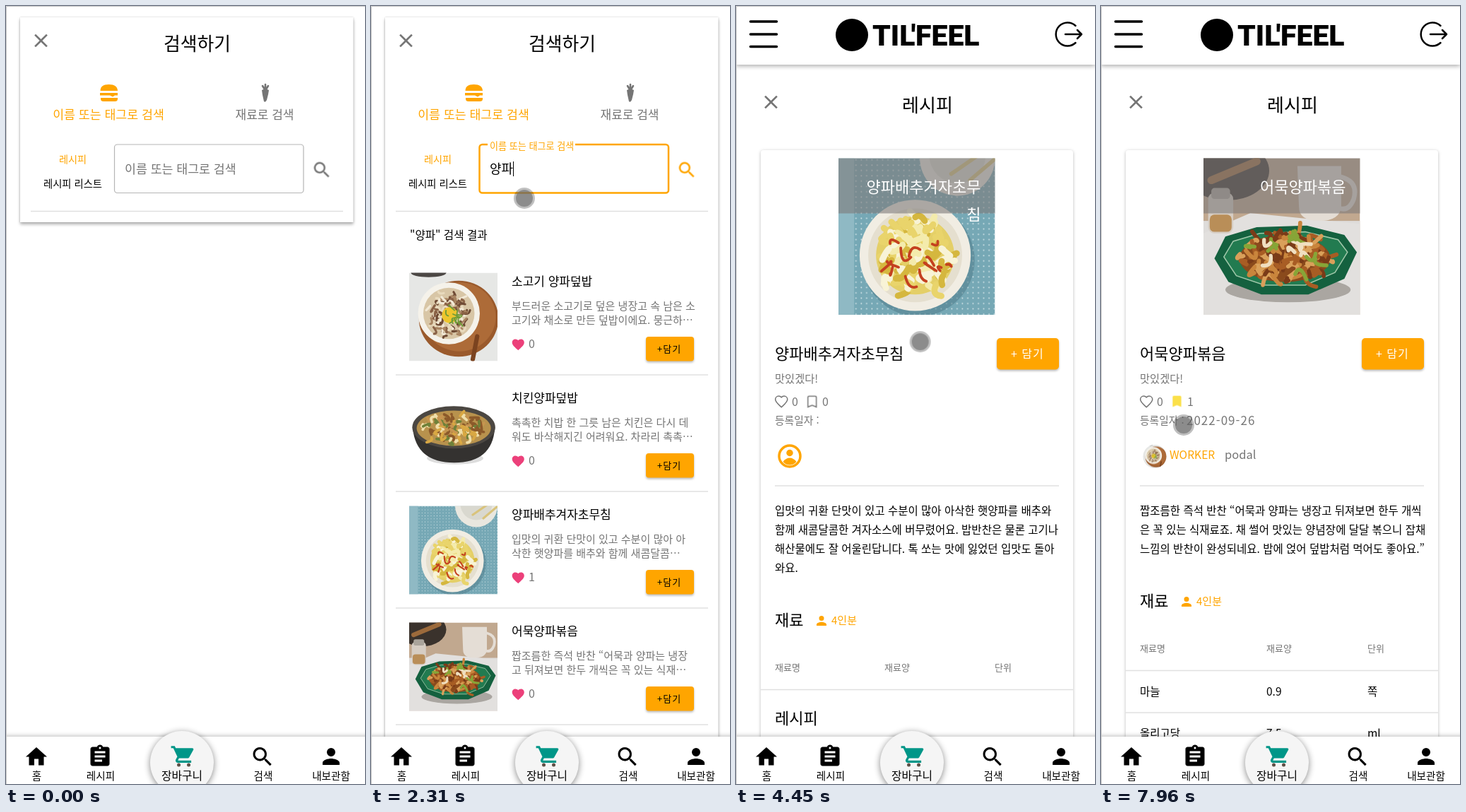
Recreate the animation shown at these times as an HTML page. Size 508 by 1101 pixels, loop 8 s.

```html
<!DOCTYPE html>
<html lang="ko">
<head>
<meta charset="utf-8">
<title>레시피 검색</title>
<style>
html, body { margin: 0; width: 100%; height: 100%; overflow: hidden; background: #fff; }
svg { display: block; }
#stage { width: 508px; height: 1101px; font-family: "Noto Sans CJK KR", "Noto Sans CJK", sans-serif; font-weight: 300; }
text { white-space: pre; }
.mid { text-anchor: middle; }
.end { text-anchor: end; }
.bold { font-weight: 500; }
.orange { fill: #ffa500; }
.gray { fill: #757575; }
.brand { font: 900 41px Roboto, sans-serif; }
.card { fill: #fff; filter: drop-shadow(0 3px 2px #0004) drop-shadow(0 0 1px #0003); }
.paper { fill: #fff; filter: drop-shadow(0 1px 2px #0004); }
.button { fill: #ffa500; filter: drop-shadow(0 2px 1.5px #0004); }
.rule { stroke: #e0e0e0; stroke-width: 1.3; }
.line { fill: none; stroke-linecap: round; stroke-linejoin: round; }
#label { animation: float 8s infinite; }
#toast { transform-box: fill-box; transform-origin: center; animation: toast 8s infinite; }
#toast rect { fill: #323232; filter: drop-shadow(0 4px 5px #0006); }
#pointer { animation: pointer 8s linear infinite; }
</style>
</head>
<body>
<svg id="stage" viewBox="0 0 508 1101"></svg>
<script>
const LOOP = 8000;

const icons = {
  home: 'M10 20v-6h4v6h5v-8h3L12 3 2 12h3v8z',
  recipe: 'M19 3h-4.18C14.4 1.84 13.3 1 12 1s-2.4.84-2.82 2H5c-1.1 0-2 .9-2 2v14c0 1.1.9 2 2 2h14c1.1 0 2-.9 2-2V5c0-1.1-.9-2-2-2zm-7 0c.55 0 1 .45 1 1s-.45 1-1 1-1-.45-1-1 .45-1 1-1zm2 14H7v-2h7v2zm3-4H7v-2h10v2zm0-4H7V7h10v2z',
  search: 'M15.5 14h-.79l-.28-.27A6.5 6.5 0 1 0 13.73 14.43l.27.28v.79l5 4.99L20.49 19zm-6 0a4.5 4.5 0 1 1 0-9 4.5 4.5 0 0 1 0 9z',
  person: 'M12 12a4 4 0 1 0 0-8 4 4 0 0 0 0 8zm0 2c-2.67 0-8 1.34-8 4v2h16v-2c0-2.66-5.33-4-8-4z',
  cart: 'M1 2v2h2l3.6 7.59-1.35 2.45C4.5 15.4 5.5 17 7 17h12v-2H7.42c-.2 0-.3-.2-.22-.37l.9-1.63h7.45c.75 0 1.41-.41 1.75-1.03l3.58-6.49A1 1 0 0 0 20 4H5.21l-.94-2z',
  close: 'M19 6.41 17.59 5 12 10.59 6.41 5 5 6.41 10.59 12 5 17.59 6.41 19 12 13.41 17.59 19 19 17.59 13.41 12z',
  heart: 'M12 21.35l-1.45-1.32C5.4 15.36 2 12.28 2 8.5 2 5.42 4.42 3 7.5 3c1.74 0 3.41.81 4.5 2.09C13.09 3.81 14.76 3 16.5 3 19.58 3 22 5.42 22 8.5c0 3.78-3.4 6.86-8.55 11.54z',
  bookmark: 'M17 3H7c-1.1 0-2 .9-2 2v16l7-3 7 3V5c0-1.1-.9-2-2-2z'
};

const text = (x, y, size, str, attrs = '') => `<text x="${x}" y="${y}" font-size="${size}" ${attrs}>${str}</text>`;
const icon = (name, x, y, size, attrs = '') =>
  `<path transform="translate(${x} ${y}) scale(${size / 24})" d="${icons[name]}" ${attrs}/>`;
const rect = (x, y, w, h, attrs = '') => `<rect x="${x}" y="${y}" width="${w}" height="${h}" ${attrs}/>`;
const circle = (x, y, r, attrs = '') => `<circle cx="${x}" cy="${y}" r="${r}" ${attrs}/>`;
const ellipse = (x, y, rx, ry, attrs = '') => `<ellipse cx="${x}" cy="${y}" rx="${rx}" ry="${ry}" ${attrs}/>`;
const rule = (x1, x2, y) => `<path class="rule" d="M${x1} ${y}H${x2}"/>`;
const photo = (name, x, y, size) => `<use href="#${name}" x="${x}" y="${y}" width="${size}" height="${size}"/>`;
const during = (spans, content) => `<g data-on="${spans}">${content}</g>`;

// Short random curls that read as food
function food(count, cx, cy, rx, ry, colors, width) {
  let seed = count * 7 + 3;
  const rnd = () => (seed = (seed * 16807) % 2147483647) / 2147483647;
  rnd(); rnd();
  return Array.from({ length: count }, () => {
    const a = rnd() * 6.283, d = Math.sqrt(rnd());
    const x = cx + Math.cos(a) * d * rx, y = cy + Math.sin(a) * d * ry;
    const step = () => ((rnd() - .5) * 15).toFixed(1);
    return `<path class="line" stroke="${colors[Math.floor(rnd() * colors.length)]}" stroke-width="${width}"
      d="M${x.toFixed(1)} ${y.toFixed(1)}q${step()} ${step()} ${step()} ${step()}"/>`;
  }).join('');
}

const dishes = {
  beef: rect(0, 0, 100, 100, 'fill="#e6e7e5"') + ellipse(22, 0, 20, 5, 'fill="#4b4744"') +
    ellipse(56, 52, 45, 43, 'fill="#9a5a2c"') + ellipse(57, 50, 41, 39, 'fill="#ad6b38"') +
    circle(45, 46, 35, 'fill="#f5f2ea"') + circle(45, 46, 29, 'fill="#d8c6a6"') +
    food(85, 45, 46, 24, 24, ['#8a6246', '#f2e9d6', '#a98562', '#6f4b35', '#e8dabd'], 2.5) +
    circle(46, 48, 9, 'fill="#edc52d"') + food(12, 52, 52, 10, 10, ['#6f9b38'], 1.5) +
    '<path class="line" d="M72 98 77 72" stroke="#7b431f" stroke-width="5"/>',
  chicken: rect(0, 0, 100, 100, 'fill="#fff"') + ellipse(52, 78, 32, 7, 'fill="#ddd"') +
    '<path d="M4 44Q8 83 51 83T97 44Z" fill="#343230"/>' + ellipse(50.5, 43, 47, 24, 'fill="#4b4742"') +
    ellipse(50.5, 44, 42, 20, 'fill="#b8924d"') +
    food(90, 50, 44, 33, 17, ['#d9a843', '#f0dfaa', '#8c5a2a', '#c79550', '#6f8139'], 3),
  cabbage: rect(0, 0, 100, 100, 'fill="#76a8b5"') + rect(0, 0, 100, 100, 'fill="url(#dots)"') +
    rect(0, 0, 10, 100, 'fill="#8fb9c4"') +
    circle(76, 0, 24, 'fill="#e9e7df"') + circle(76, -2, 18, 'fill="#d9d8cf"') +
    '<path class="line" d="M72 10 98-8M84 14 104-3" stroke="#d9c37b" stroke-width="2.5"/>' +
    ellipse(51, 65, 36, 36, 'fill="#4c7b88" opacity=".5"') + circle(49, 62, 35.5, 'fill="#f1ede3"') +
    circle(49, 62, 30, 'fill="#e5dfcf"') + ellipse(49, 62, 25, 25, 'fill="#e4cf67"') +
    food(110, 49, 62, 23, 23, ['#e9d46b', '#f4ebac', '#d5b73e', '#f8f3d6'], 4) +
    food(13, 49, 62, 22, 22, ['#c4411f'], 1.7),
  fishcake: rect(0, 0, 100, 100, 'fill="#c1a88f"') + rect(0, 40, 100, 60, 'fill="#dedcda"') +
    '<path d="M0 48 30 35 100 42V100H0Z" fill="#e2e0de"/>' +
    ellipse(15, 8, 27, 19, 'fill="#3a322c"') + '<path class="line" d="M5 14 34 2" stroke="#9c6a3b" stroke-width="5"/>' +
    '<path d="M60 5H88V31Q87 40 74 40T61 31Z" fill="#e4ddd5"/><path class="line" d="M88 12q11 3 8 14-3 8-9 6" stroke="#e4ddd5" stroke-width="3"/>' +
    rect(3, 22, 16, 26, 'rx="4" fill="#d6cdc3"') + rect(5, 19, 12, 7, 'rx="2" fill="#aaa49b"') +
    rect(4, 36, 14, 11, 'rx="3" fill="#b98e58"') +
    ellipse(54, 84, 40, 8, 'fill="#aaa6a1"') +
    '<path d="M7 64 14 50 34 44 66 43 90 49 98 60 90 77 67 87 37 87 16 79Z" fill="#14613f"/>' +
    '<path d="M13 63 19 53 36 48 65 47 86 52 92 60 84 73 65 81 39 81 21 75Z" fill="#227b50" stroke="#9fc7a9" stroke-width=".7"/>' +
    ellipse(52, 64, 29, 15, 'fill="#8a4a1c"') +
    food(95, 52, 63, 27, 16, ['#a85d24', '#c9853c', '#7a3b18', '#d9a05a'], 2.6) +
    food(16, 50, 62, 22, 14, ['#87a537', '#f0dfc0'], 2.4)
};

const defs = `<defs>
  <pattern id="dots" width="3.4" height="3.4" patternUnits="userSpaceOnUse">${circle(1, 1, .45, 'fill="#cfe2e6"')}</pattern>
  <clipPath id="avatar">${circle(76, 637.5, 16.5)}</clipPath>
  ${Object.entries(dishes).map(([id, art]) => `<symbol id="${id}" viewBox="0 0 100 100">${art}</symbol>`).join('')}
</defs>`;

const results = [
  ['beef', '소고기 양파덮밥', '부드러운 소고기로 덮은 냉장고 속 남은 소', '고기와 채소로 만든 덮밥이에요. 뭉근하…', 0],
  ['chicken', '치킨양파덮밥', '촉촉한 치밥 한 그릇 남은 치킨은 다시 데', '워도 바삭해지긴 어려워요. 차라리 촉촉…', 0],
  ['cabbage', '양파배추겨자초무침', '입맛의 귀환 단맛이 있고 수분이 많아 아', '삭한 햇양파를 배추와 함께 새콤달콤…', 1],
  ['fishcake', '어묵양파볶음', '짭조름한 즉석 반찬 “어묵과 양파는 냉장', '고 뒤져보면 한두 개씩은 꼭 있는 식재…', 0]
];

const resultRow = ([dish, title, line1, line2, likes], i) => `<g transform="translate(0 ${i * 165})">
  ${photo(dish, 54, 377.5, 125)}
  ${text(199, 396, 17, title)}
  ${text(199, 430, 15, line1, 'class="gray"')}${text(199, 450, 15, line2, 'class="gray"')}
  ${icon('heart', 198, 469, 20.5, 'fill="#ec407a"')}${text(223, 484, 16, likes, 'class="gray"')}
  ${rect(389, 468, 68, 34.5, 'rx="4" class="button"')}${text(405, 490, 13, '+담기', 'letter-spacing="1"')}
  ${rule(35, 477, 522)}</g>`;

const closeIcon = y => icon('close', 33.5, y - 16, 32, 'class="gray"');
const fieldBox = (color, width) => rect(153.5, 196, 267.5, 68.5, `rx="4" fill="none" stroke="${color}" stroke-width="${width}"`);

const burger = `<g class="orange"><path d="M133.5 120q0-9 12-9t12.500 9z"/>
  <path d="M133 123h25v3.500h-4l-3 2-4-2h-14z"/><path d="M134 130h24v1.500q0 3.500-4 3.500h-16q-4 0-4-3.500z"/></g>`;
const carrot = `<g class="gray"><path d="M362 119q5-3 10 0l-1 6-2 8q-2 4-4 2l-2-9z"/>
  <path class="line" stroke="#757575" stroke-width="2.600" d="M367 119v-8M366 118l-3-5M368 118l3-5"/></g>`;

const typed = [[1370, 1435, 'ㅇ'], [1435, 1500, '야'], [1500, 1640, '양'], [1640, 1770, '양ㅍ'], [1770, 3850, '양파']];

const searchPage = during('0 3850', `
  ${during('0 2230', rect(20, 16, 471.5, 290, 'class="card"'))}
  ${during('2230 3850', rect(20, 16, 471.5, 1100, 'class="card"'))}
  ${closeIcon(49)}${text(270.5, 63, 25.8, '검색하기', 'class="mid"')}
  ${burger}${text(145, 160, 17.3, '이름 또는 태그로 검색', 'class="mid orange"')}
  ${carrot}${text(366, 160, 17, '재료로 검색', 'class="mid gray"')}
  ${text(94.5, 222, 14.2, '레시피', 'class="mid orange bold"')}${text(94.500, 257, 14.3, '레시피 리스트', 'class="mid"')}
  ${during('0 700', fieldBox('#b5b5b5', 1.2))}${during('700 940', fieldBox('#212121', 1.2))}
  ${during('940 3850', fieldBox('#ffa500', 2.5) + rect(165, 193, 124, 6, 'fill="#fff"'))}
  <g id="label">${text(0, 0, 17.3, '이름 또는 태그로 검색')}</g>
  ${typed.map(([a, b, str]) => during(`${a} ${b}`, text(168, 237, 17.9, str))).join('')}
  ${during('940 1370', rect(168, 220, 1, 21))}
  ${during('1370 1640', rect(185, 220, 1, 21))}
  ${during('1640 2670 3170 3670', rect(201, 220, 1, 21))}
  ${during('0 1000', icon('search', 432, 217, 30, 'class="gray"'))}
  ${during('1000 3850', icon('search', 432, 217, 30, 'class="orange"'))}
  ${rule(35, 477, 290.5)}
  ${during('2230 3850', text(55, 330, 15.6, '"양파" 검색 결과') + results.map(resultRow).join(''))}`);

const header = `${rect(0, 0, 508, 83, 'fill="#fff" style="filter:drop-shadow(0 2px 3px #0005)"')}
  <path class="line" stroke="#000" stroke-width="3.500" d="M20.500 22H57.500M20.500 40H57.500M20.500 57.500H57.500"/>
  ${circle(164, 41, 23)}<text x="193" y="56" class="brand">TIL'FEEL</text>
  <path class="line" stroke="#000" stroke-width="2.500" d="M480.500 28A16.500 16.500 0 1 0 480.500 52M466 40H489M483 34 489 40 483 46"/>`;

const avatarIcon = `<g class="orange">${circle(76, 637, 15, 'fill="none" stroke="#ffa500" stroke-width="3.500"')}
  ${circle(76, 632.5, 4.700)}<path d="M66.500 645q4-5.500 9.500-5.500t9.500 5.500q-4 4.500-9.500 4.500t-9.500-4.500z"/></g>`;

const recipe = ({ dish, title, banner, body, columns, shift }) => `
  ${photo(dish, 145, 215.5, 221.5)}${rect(145, 215.5, 221.5, 78, 'fill="#7d7a7a" opacity=".6"')}
  ${banner.map((str, i) => text(346.5, 264 + i * 39, 22, str, 'class="end" fill="#fff"')).join('')}
  ${text(55, 500, 22, title)}
  ${body.map((str, i) => text(55, 719.5 + i * 27.3, 15.5, str)).join('')}
  <g transform="translate(0 ${shift})">
    ${text(55, 877, 22, '재료')}${icon('person', 110.5, 859.5, 21, 'class="orange"')}
    ${text(135, 875, 15, '4인분', 'class="orange bold"')}
    ${['재료명', '재료양', '단위'].map((str, i) => text(columns[i], 941, 13, str, 'class="gray"')).join('')}
    ${rule(35, 477, 967.5)}
  </g>`;

const cabbageRecipe = recipe({
  dish: 'cabbage', title: '양파배추겨자초무침', banner: ['양파배추겨자초무', '침'], columns: [55, 210, 366], shift: 0,
  body: ['입맛의 귀환 단맛이 있고 수분이 많아 아삭한 햇양파를 배추와', '함께 새콤달콤한 겨자소스에 버무렸어요. 밥반찬은 물론 고기나',
    '해산물에도 잘 어울린답니다. 톡 쏘는 맛에 잃었던 입맛도 돌아', '와요.']
}) + text(55, 1016, 22, '레시피');

const tableRow = (cells, y) => cells.map((str, i) => text([55, 234, 377][i], y, 15.5, str)).join('');

const fishcakeRecipe = recipe({
  dish: 'fishcake', title: '어묵양파볶음', banner: ['어묵양파볶음'], columns: [55, 234, 377], shift: -27,
  body: ['짭조름한 즉석 반찬 “어묵과 양파는 냉장고 뒤져보면 한두 개씩', '은 꼭 있는 식재료죠. 채 썰어 맛있는 양념장에 달달 볶으니 잡채',
    '느낌의 반찬이 완성되네요. 밥에 얹어 덮밥처럼 먹어도 좋아요.”']
}) + text(121, 593, 17, '2022-09-26', 'class="gray" letter-spacing="1"') +
  text(97, 641, 15.6, 'WORKER', 'class="orange bold"') + text(175, 641, 16.5, 'podal', 'class="gray"') +
  tableRow(['마늘', '0.9', '쪽'], 976) + rule(35, 477, 1000) + tableRow(['올리고당', '7.5', 'ml'], 1035);

const detailPage = during('3850 8000', `${header}
  ${closeIcon(136)}${text(271, 150, 26, '레시피', 'class="mid"')}
  ${rect(35, 204, 442, 900, 'rx="4" class="paper"')}
  ${during('3850 4660', cabbageRecipe)}${during('4660 8000', fishcakeRecipe)}
  ${rect(369, 470, 88, 44.5, 'rx="5" class="button"')}${text(389, 497.5, 16, '+ 담기', 'class="bold" fill="#fff" letter-spacing="1"')}
  <g class="gray">${text(55, 533, 15.3, '맛있겠다!')}${text(79, 565.5, 16, '0')}${text(55, 592, 14.8, '등록일자 :')}
    ${during('3850 6300', text(122, 565.5, 16, '0'))}${during('6300 8000', text(122, 565.5, 16, '1'))}</g>
  ${icon('heart', 54, 549.500, 20.5, 'fill="none" stroke="#757575" stroke-width="1.800"')}
  ${during('3850 6300', icon('bookmark', 97.500, 549.500, 20.5, 'fill="none" stroke="#757575" stroke-width="1.800"'))}
  ${during('6300 8000', icon('bookmark', 97, 549, 21, 'fill="#fbe04a"'))}
  ${during('3850 5530', avatarIcon)}
  ${during('5530 8000', `<g clip-path="url(#avatar)">${photo('beef', 59, 620.5, 34)}</g>`)}
  ${rule(55, 457, 679)}
  <g id="toast">${rect(43, 522.500, 426, 59.500, 'rx="4"')}${text(62, 557.500, 16, '북마크 추가!', 'fill="#fff"')}</g>`);

const navLabel = (x, str, size = 14.6) => text(x, 1095, size, str, 'class="mid"');
const navBar = `${rect(-10, 1034, 528, 80, 'fill="#fff" style="filter:drop-shadow(0 -1px 3px #0004)"')}
  ${circle(249, 1071, 45, 'fill="#f5f5f5" style="filter:drop-shadow(0 2px 5px #0007)"')}
  ${icon('home', 25, 1044.5, 36)}${icon('recipe', 115, 1044, 36)}${icon('search', 345, 1044.5, 36)}${icon('person', 442, 1044, 36)}
  ${icon('cart', 232, 1044, 38, 'fill="#009688"')}${circle(244.500, 1074, 2.500, 'fill="#5f5047"')}${circle(258.500, 1074, 2.500, 'fill="#5f5047"')}
  ${navLabel(43.5, '홈')}${navLabel(134, '레시피')}${navLabel(249, '장바구니', 15.8)}${navLabel(364, '검색')}${navLabel(460, '내보관함')}`;

const pressed = '940 1150 3700 3850 5860 6200';
const released = '130 940 1150 3700 3850 5860 6200 8000';
const pointer = `<g id="pointer">
  ${during(released, circle(0, 0, 15, 'fill="#000" opacity=".25"') + circle(0, 0, 12, 'fill="#707070" opacity=".65"'))}
  ${during(pressed, circle(0, 0, 16, 'fill="#e6e05a" opacity=".45"') + circle(0, 0, 14, 'fill="#b9b81a" opacity=".75"'))}</g>`;

const stage = document.getElementById('stage');
stage.innerHTML = defs + rect(0, 0, 508, 1101, 'fill="#fff"') + searchPage + detailPage + navBar +
  '<path d="M.500 1101V.500H508" fill="none" stroke="#c8c8c8"/>' + pointer;

const keyframes = (name, stops) =>
  `@keyframes ${name}{${stops.map(([ms, css]) => `${ms / LOOP * 100}%{${css}}`).join('')}}`;

const route = [
  [0, 484, 1045], [130, 484, 1045], [270, 415, 635], [340, 327, 486], [410, 270, 402], [480, 232, 344],
  [560, 218, 300], [700, 210, 246], [870, 209, 240], [2250, 209, 240], [2450, 235, 345], [2880, 376, 797],
  [3250, 428, 1000], [3680, 325, 925], [3900, 325, 925], [4450, 261, 475], [4800, 150, 530], [5200, 113, 561],
  [6200, 113, 561], [6500, 205, 580], [6870, 395, 652], [6960, 416, 747], [7250, 477, 896], [7500, 440, 840],
  [7760, 310, 720], [7960, 117, 593], [8000, 117, 593]
];
const labelLow = 'transform:translate(168px,237px);fill:#757575';
const labelHigh = 'transform:translate(168px,202.500px) scale(.757);fill:#ffa500';
const toastSmall = 'opacity:0;transform:scale(.75,.5625)';
const toastFull = 'opacity:1;transform:none';

let css = keyframes('pointer', route.map(([ms, x, y]) => [ms, `transform:translate(${x}px,${y}px)`])) +
  keyframes('float', [[0, labelLow], [940, labelLow], [1140, labelHigh], [LOOP, labelHigh]]) +
  keyframes('toast', [[0, toastSmall], [6250, toastSmall], [6475, toastFull], [7760, toastFull], [7940, toastSmall], [LOOP, toastSmall]]);

// Each data-on lists start and end times in turn
stage.querySelectorAll('[data-on]').forEach((el, i) => {
  const times = el.dataset.on.split(' ').map(Number);
  css += keyframes(`on${i}`, [[0, 'opacity:0'], ...times.map((ms, k) => [ms, `opacity:${1 - k % 2}`])]);
  el.style.animation = `on${i} ${LOOP}ms step-end infinite`;
});
document.head.appendChild(document.createElement('style')).textContent = css;
</script>
</body>
</html>
```
